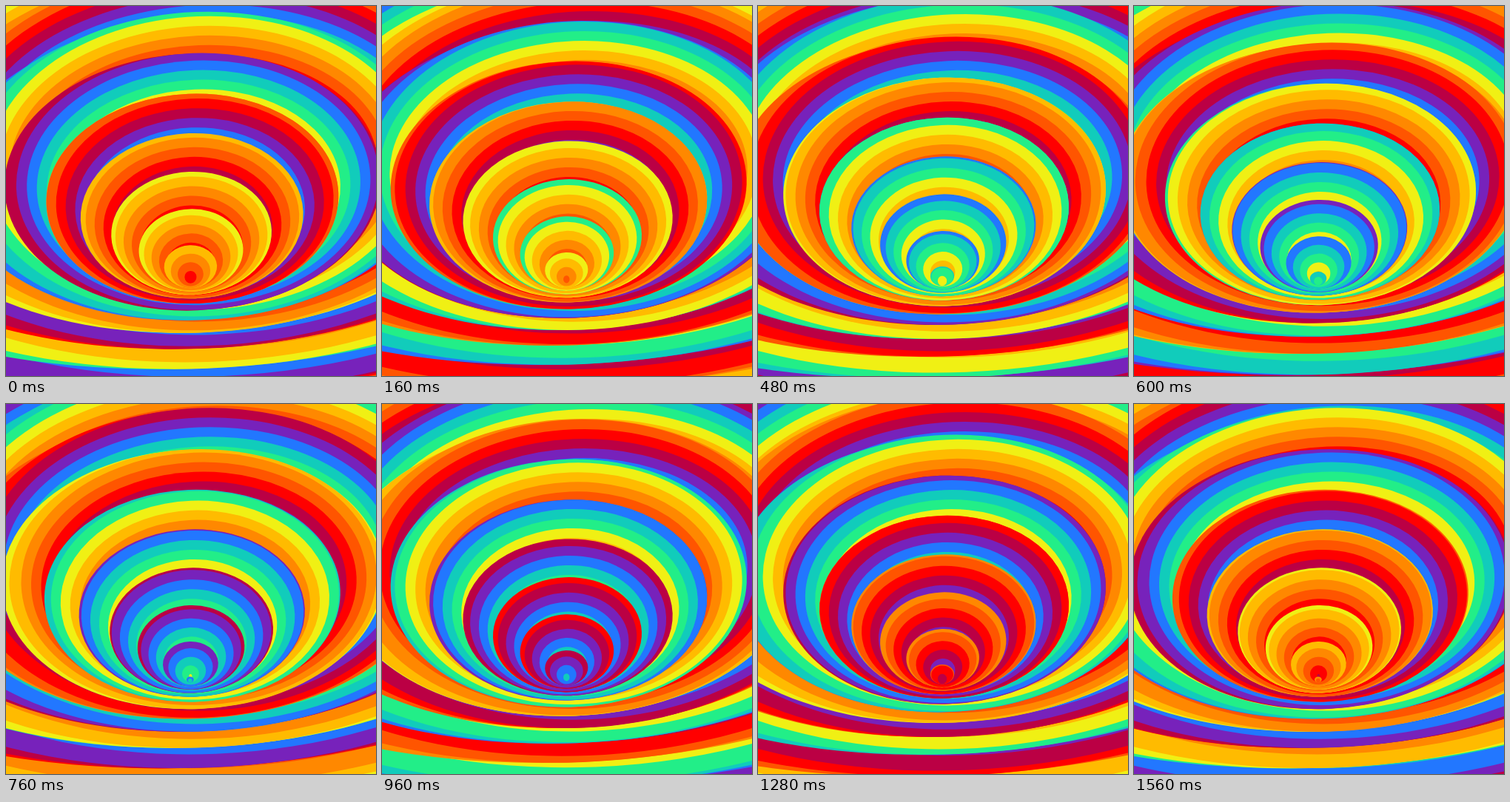
Write an HTML page with a canvas that moves like this. It is 500 by 500 pixels and loops after 1600 ms.

```html
<!DOCTYPE html>
<html>
<head>
<meta charset="utf-8">
<title>Rainbow funnel</title>
<style>
  html, body { margin: 0; width: 100%; height: 100%; overflow: hidden; }
  canvas { display: block; width: 500px; height: 500px; }
</style>
</head>
<body>
<canvas id="stage" width="500" height="500"></canvas>
<script>
const ctx = document.getElementById('stage').getContext('2d');
const COLORS = ['#f0f014', '#ffbb00', '#ff8800', '#ff5500', '#ff0000',
                '#bb0044', '#7722bb', '#2277ff', '#11ccbb', '#22ee88'];
const LOOP = 1600, STEP = 40, FOLD_TIME = 800, COLOR_TIME = 160;
const TILT = -0.04;

const above = (x, limit) => Math.max(0, x - limit);

// Outline of the fold at depth s: larger s is further out.
const foldTop = s => 172 - 52.7 * s - 0.75 * s * s;
const foldRadius = s => 150.5 + 44.4 * s + 2.5 * s * s + 0.15 * s ** 3;
const foldCenter = s => 251.2 + 0.6 * s;
function foldBottom(s) {
  const q = s - 1;
  return 402 + 8 * q + 1.4 * q * q + 0.104 * q ** 3 - 0.5 * above(-q, 1) ** 2;
}

// Colour position at the far and the near edge of a fold, and its lag on the left side.
const farColor = s => 0.28 + 0.44 * (s + 1.7) ** 2 - 0.2 * above(s, 1.4) ** 2;
const nearColor = s => 3 + 0.7 * s + 0.37 * s * s;
const leftLag = s => Math.min(3, 0.13 * above(s, -1) ** 2);

function disc(left, right, top, bottom, index) {
  const rx = (right - left) / 2, ry = (bottom - top) / 2;
  if (rx <= 0 || ry <= 0) return;
  ctx.fillStyle = COLORS[((index % 10) + 10) % 10];
  ctx.beginPath();
  ctx.ellipse(left + rx, top + ry, rx, ry, TILT, 0, 2 * Math.PI);
  ctx.fill();
}

function drawFold(s, time) {
  const first = farColor(s) - time / COLOR_TIME;
  const nearEdge = Math.min(1.2, nearColor(s) - farColor(s));
  const lag = leftLag(s);
  const start = Math.min(nearEdge, -lag);
  const spread = above(s, 1.7);
  const cx = foldCenter(s), radius = foldRadius(s);
  const top = foldTop(s), bottom = foldBottom(s);
  const topStep = Math.min(13, 13 + 0.7 * (s + 1));
  const sideStep = Math.min(13.5, 12 + 0.9 * s);
  const bottomStep = 0.7 * (bottom - foldBottom(s - 1));

  // v counts colour bands inward from the far crest; negative bands lie behind it.
  function band(v, index) {
    const behind = v < 0 ? v / start : 0;
    const grow = 13.75 * spread * behind;
    disc(cx - radius + sideStep * above(v, -lag) - grow,
         cx + radius - sideStep * above(v, 0) + grow,
         top + topStep * above(v, 0) + 8 * (spread * behind) ** 2,
         bottom - bottomStep * above(v, nearEdge),
         index);
  }

  let index = Math.floor(first + start);
  band(start, index);
  while (++index - first < 6) band(index - first, index);
}

function draw(time) {
  ctx.fillStyle = COLORS[2];
  ctx.fillRect(0, 0, 500, 500);
  const phase = (time / FOLD_TIME) % 1;
  for (let k = 8; k >= -3; k--) drawFold(k - phase, time);
}

function tick() {
  const time = performance.now() % LOOP;
  draw(Math.floor(time / STEP) * STEP);
  requestAnimationFrame(tick);
}
tick();
</script>
</body>
</html>
```
